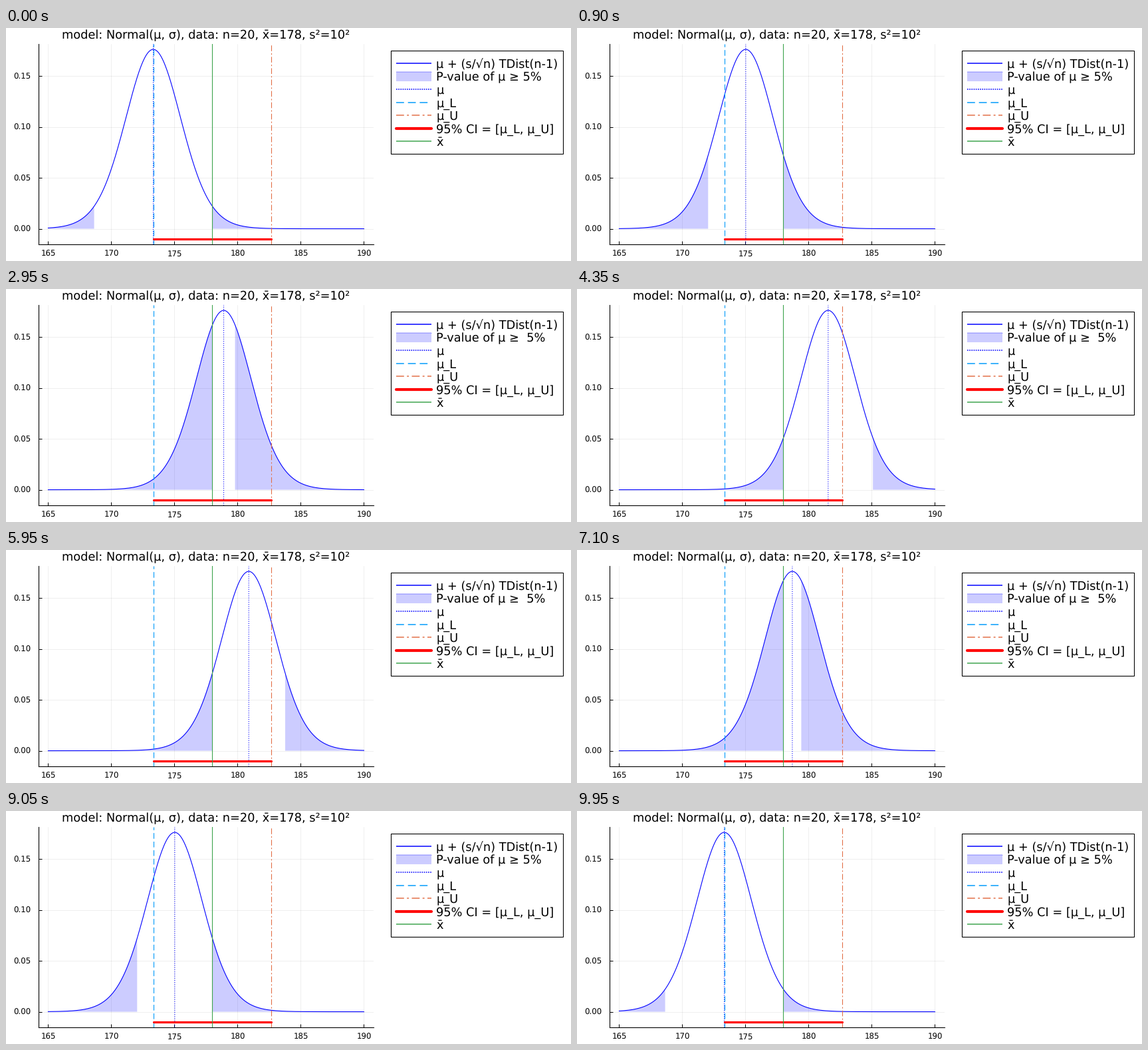
Recreate the animation shown at these times as a matplotlib script. Size 850 by 350 pixels, loop 10 s.

```python
import math

import matplotlib.pyplot as plt
import numpy as np
from matplotlib.animation import FuncAnimation
from matplotlib.patches import Rectangle

W, H, DPI = 850, 350, 100
PX = 72 / DPI  # points per pixel
FRAMES, INTERVAL = 200, 50

plt.rcParams.update({
    "font.family": "DejaVu Sans",
    "text.hinting": "none",
    "lines.scale_dashes": False,
    "lines.dash_capstyle": "butt",
})

# Sample summary and the 95% interval for the mean
N, XBAR, S = 20, 178, 10
DF = N - 1
SE = S / math.sqrt(N)
T975 = 2.093024
MU_L, MU_U = XBAR - T975 * SE, XBAR + T975 * SE
X0, X1 = 165, 190
PEAK = math.gamma((DF + 1) / 2) / (math.sqrt(DF * math.pi) * math.gamma(DF / 2) * SE)

BLUE, SKY, CORAL, GREEN, RED = "#0000ff", "#009afa", "#e26f46", "#3da44d", "#ff0000"
BIG, SMALL = 17.75 * PX, 11.8 * PX


def density(x, mu):
    t = (x - mu) / SE
    return PEAK * (1 + t * t / DF) ** (-(DF + 1) / 2)


def dashes(*lengths):
    return (0, [v * PX for v in lengths])


fig = plt.figure(figsize=(W / DPI, H / DPI), dpi=DPI, facecolor="white")

# Page layer in pixel coordinates, y pointing down
page = fig.add_axes([0, 0, 1, 1], zorder=2)
page.set(xlim=(0, W), ylim=(H, 0))
page.axis("off")

# Plot layer
LEFT, RIGHT, TOP, BOTTOM = 49.2, 552.7, 23.6, 325.4
ax = fig.add_axes([LEFT / W, 1 - BOTTOM / H, (RIGHT - LEFT) / W, (BOTTOM - TOP) / H])
y_lo, y_hi = -0.01, PEAK
pad = 0.03 * (y_hi - y_lo)
ax.set(xlim=(X0 - 0.75, X1 + 0.75), ylim=(y_lo - pad, y_hi + pad))
ax.set_xticks(range(165, 191, 5))
ax.set_yticks([0, 0.05, 0.10, 0.15])
ax.tick_params(direction="in", length=4.7 * PX, width=1 * PX,
               labelbottom=False, labelleft=False)
ax.grid(color="black", alpha=0.1, linewidth=0.6 * PX)
ax.set_axisbelow(True)
for side in ("top", "right"):
    ax.spines[side].set_visible(False)
for side in ("left", "bottom"):
    ax.spines[side].set_linewidth(1.1 * PX)


def label(x, y, text, size, align="left"):
    """Place text with its capitals centred on y."""
    baseline = y + 0.365 * size / PX
    return page.text(x, baseline, text, fontsize=size, ha=align, va="baseline")


for v in range(165, 191, 5):
    label(63.5 + 19 * (v - X0), 339, str(v), SMALL, "center")
for i in range(4):
    label(37, 301.6 - 76.5 * i, f"{0.05 * i:.2f}", SMALL, "right")
label(300.8, 9.5, "model: Normal(μ, σ), data: n=20, x\u0304=178, s²=10²", BIG, "center")

# Series
xs = np.linspace(X0, X1, 501)
curve, = ax.plot([], [], color=BLUE, lw=1.1 * PX, zorder=3)
tails = [ax.fill([0], [0], color=BLUE, alpha=0.2, lw=0, zorder=3.1)[0] for _ in range(2)]


def vline(x, color, style, z):
    return ax.axvline(x, color=color, lw=1.1 * PX, ls=style, zorder=z)


mu_line = vline(MU_L, BLUE, dashes(1.1, 2.1), 3.2)
mu_line.set_snap(False)
vline(MU_L, SKY, dashes(8.6, 4.3), 3.3)
vline(MU_U, CORAL, dashes(8.6, 3.2, 2.1, 3.2), 3.4)
ax.plot([MU_L, MU_U], [-0.01, -0.01], color=RED, lw=3.2 * PX,
        solid_capstyle="round", zorder=3.5)
vline(XBAR, GREEN, "-", 3.6)

# Legend
page.add_patch(Rectangle((579, 34), 259, 155, fc="white", ec="black", lw=1.1 * PX))


def row_y(i):
    return 53.4 + 19.43 * i


def key(i, color, style="-", width=1.5):
    page.plot([587.5, 640], [row_y(i)] * 2, color=color, ls=style, lw=width * PX,
              solid_capstyle="round" if width > 2 else "butt")


key(0, BLUE)
page.add_patch(Rectangle((587.5, 65.3), 52.7, 14.9, fc=BLUE, alpha=0.2, lw=0))
page.plot([587.5, 640], [65.6] * 2, color=BLUE, alpha=0.2, lw=1 * PX)
key(2, BLUE, dashes(1.7, 1.5))
key(3, SKY, dashes(11.8, 5.9))
key(4, CORAL, dashes(11.8, 4.4, 2.9, 4.4))
key(5, RED, width=4.2)
key(6, GREEN)

names = ["μ + (s/√n) TDist(n-1)", "P-value of μ ≥ 5%", "μ", "μ_L", "μ_U",
         "95% CI = [μ_L, μ_U]", "x\u0304"]
texts = [label(647.5, row_y(i) + 0.3, name, BIG) for i, name in enumerate(names)]
p_text = texts[1]


def shade(patch, a, b, mu):
    x = np.linspace(a, b, 200)
    top = np.column_stack([x, density(x, mu)])
    patch.set_xy(np.vstack([[a, 0], top, [b, 0]]))


def update(frame):
    # Sweep across the interval, then back again
    step = min(frame, FRAMES - 1 - frame)
    mu = MU_L + (MU_U - MU_L) * step / (FRAMES // 2 - 1)
    lo, hi = sorted((XBAR, 2 * mu - XBAR))
    curve.set_data(xs, density(xs, mu))
    shade(tails[0], X0, lo, mu)
    shade(tails[1], hi, X1, mu)
    mu_line.set_xdata([mu, mu])
    gap = "  " if mu > XBAR else " "
    p_text.set_text(f"P-value of μ ≥{gap}5%")
    return curve, *tails, mu_line, p_text


anim = FuncAnimation(fig, update, frames=FRAMES, init_func=lambda: update(0),
                     interval=INTERVAL, repeat=True, repeat_delay=0, blit=False)
plt.show()
```
